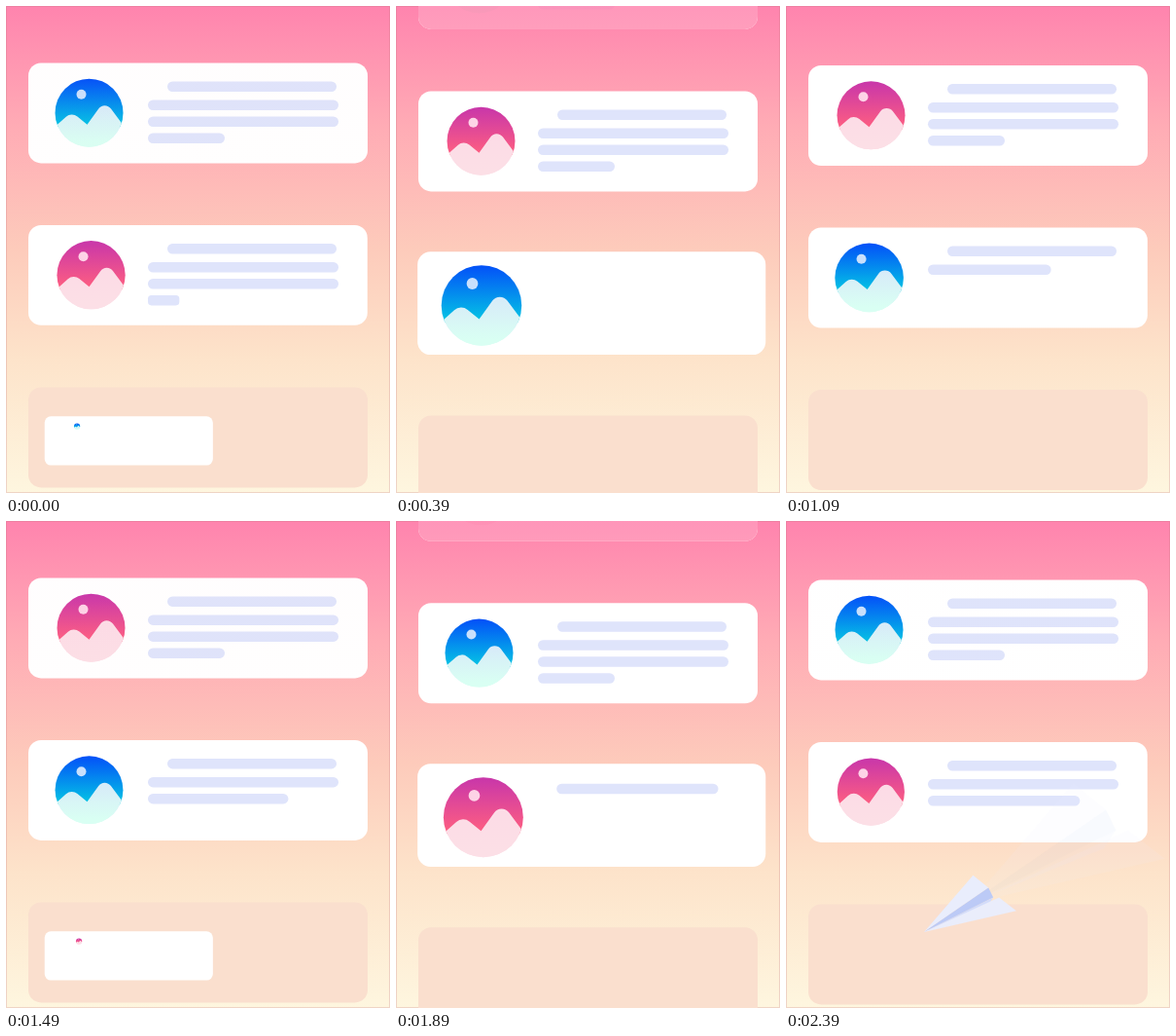
Animation, 395 px wide and 500 px high, one loop 2490 ms. Source, as an HTML page with a canvas:

```html
<!DOCTYPE html>
<html lang="en">
<head>
<meta charset="utf-8">
<title>Card feed</title>
<style>
html, body { margin: 0; width: 100%; height: 100%; overflow: hidden; }
canvas { display: block; }
</style>
</head>
<body>
<canvas id="stage" width="395" height="500"></canvas>
<script>
const ctx = document.getElementById('stage').getContext('2d');
const LOOP = 2490, PITCH = 166.5, SLOT_Y = 394, X = 23, W = 349, H = 103;

const THEMES = [
  { sky: ['#0350f8', '#04c6e4'], sun: '#c9e0fc', hill: ['#d7eaf9', '#d9fff3'], dx: 0, type: [595, 1.073, .908] },
  { sky: ['#c836aa', '#ff5f80'], sun: '#fdd3e6', hill: ['#fcdbe6', '#fcdfe6'], dx: 2, type: [170, .72, 1] }
];

// Ages count in ms from the moment a card opens
const scroll = age => 1 / (1 + Math.exp((279 - age) * .0149));
const spring = (age, size, decay, speed) => size * Math.exp(-age / decay) * Math.cos(age * speed);
const typed = (age, [start, rate, power]) => rate * Math.max(0, age - start) ** power;

function ramp(y0, y1, ...stops) {
  const g = ctx.createLinearGradient(0, y0, 0, y1);
  stops.forEach(([at, color]) => g.addColorStop(at, color));
  return g;
}
const sky = ramp(0, 500, [0, '#ff84ae'], [.25, '#ffacb5'], [.5, '#fdcbbb'],
  [.72, '#fde3ca'], [1, '#fef6df']);

function round(x, y, w, h, r, fill) {
  ctx.fillStyle = fill;
  ctx.beginPath();
  ctx.roundRect(x, y, w, h, r);
  ctx.fill();
}
function disc(x, y, r, fill) {
  ctx.fillStyle = fill;
  ctx.beginPath();
  ctx.arc(x, y, r, 0, 7);
  ctx.fill();
}
function poly(fill, ...pts) {
  ctx.fillStyle = fill;
  ctx.beginPath();
  pts.forEach(([x, y]) => ctx.lineTo(x, y));
  ctx.fill();
}

function drawIcon(x, y, r, { sky: [top, low], sun, hill }) {
  if (r <= 0) return;
  ctx.save();
  ctx.translate(x, y);
  ctx.scale(r / 35, r / 35);
  // The disc turns hill-coloured low down, so no dark rim shows below the hills
  disc(0, 0, 35, ramp(-35, 35, [0, top], [.7, low], [.73, hill[0]], [1, hill[1]]));
  ctx.clip();
  disc(-8, -19, 5, sun);
  ctx.fillStyle = ramp(-8, 30, [0, hill[0]], [1, hill[1]]);
  ctx.beginPath();
  ctx.moveTo(-36, 15);
  ctx.arcTo(-18, -1, -2, 12, 9);
  ctx.lineTo(-2, 12);
  ctx.arcTo(16, -13, 35, 13, 8);
  ctx.lineTo(36, 14);
  ctx.lineTo(36, 36);
  ctx.lineTo(-36, 36);
  ctx.fill();
  ctx.restore();
}

function drawLines(y, amount) {
  [174, 196, 196, 79].forEach((full, i) => {
    const w = Math.min(full, amount);
    amount -= w;
    if (w <= 0) return;
    const left = i ? 123 : 143 - 19 * (1 - w / full);
    const top = i ? 21 + 17 * i : 19;
    round(X + left, y + top, w, 10.5, Math.min(5.2, w / 9), '#dfe4fb');
  });
}

function drawCard(y, age, theme, alpha) {
  if (age < -40 || alpha < .005) return;
  const gap = spring(age, 177, 155, .0058), w = W - gap;
  const rect = [X + gap * .095, y + gap * .17, w, H - gap * .3, 13 * w / W];
  const grow = -spring(age, 32, 240, .0081);
  round(...rect, '#fff');
  drawIcon(X + 62.5 + theme.dx + grow * .39, y + 51.3 + grow * .35, 35 + grow, theme);
  drawLines(y, typed(age, theme.type));
  // Fade the whole card by laying the background over it
  ctx.globalAlpha = 1 - alpha;
  round(...rect, sky);
  ctx.globalAlpha = 1;
}

function drawPlane(age, alpha) {
  const q = -(age + 100) / 100, bend = q * Math.abs(q), s = 1 + 1.1 * q;
  ctx.save();
  ctx.globalAlpha = alpha;
  ctx.translate(142 + 48 * bend, 422 - 30 * bend);
  ctx.scale(s, s);
  poly('#e9edfc', [0, 0], [51, -59], [67, -46]);
  poly('#bccaf6', [0, 0], [67, -46], [72, -36]);
  poly('#d3dcfa', [0, 0], [72, -36], [66, -27]);
  poly('#eaedfb', [0, 0], [78, -36], [96, -22]);
  ctx.restore();
}

const kindOf = j => j & 1;
const birth = j => Math.floor(j / 2) * LOOP + kindOf(j) * 1490;

function draw(t) {
  const rowY = j => {
    let rows = 0;
    for (let k = -3; k < 5; k++) rows += (k < j) - scroll(t - birth(k));
    return SLOT_Y + PITCH * rows;
  };
  ctx.fillStyle = sky;
  ctx.fillRect(0, 0, 395, 500);
  ctx.strokeStyle = 'rgba(190,110,120,.25)';
  ctx.strokeRect(.5, .5, 394, 499);

  for (let j = -3; j < 5; j++) {
    const y = rowY(j), age = t - birth(j);
    if (age < 600) round(X, y, W, H, 13, '#fadfce');
    drawCard(y, age, THEMES[kindOf(j)], 1 - scroll(t - birth(j + 2)));
  }
  for (let j = 0; j < 4; j++) {
    const age = t - birth(j);
    if (age < -330 || age > -50) continue;
    drawPlane(age - 100, .1);
    drawPlane(age, 1);
  }
}

function tick() {
  draw(performance.now() % LOOP);
  requestAnimationFrame(tick);
}
tick();
</script>
</body>
</html>
```
